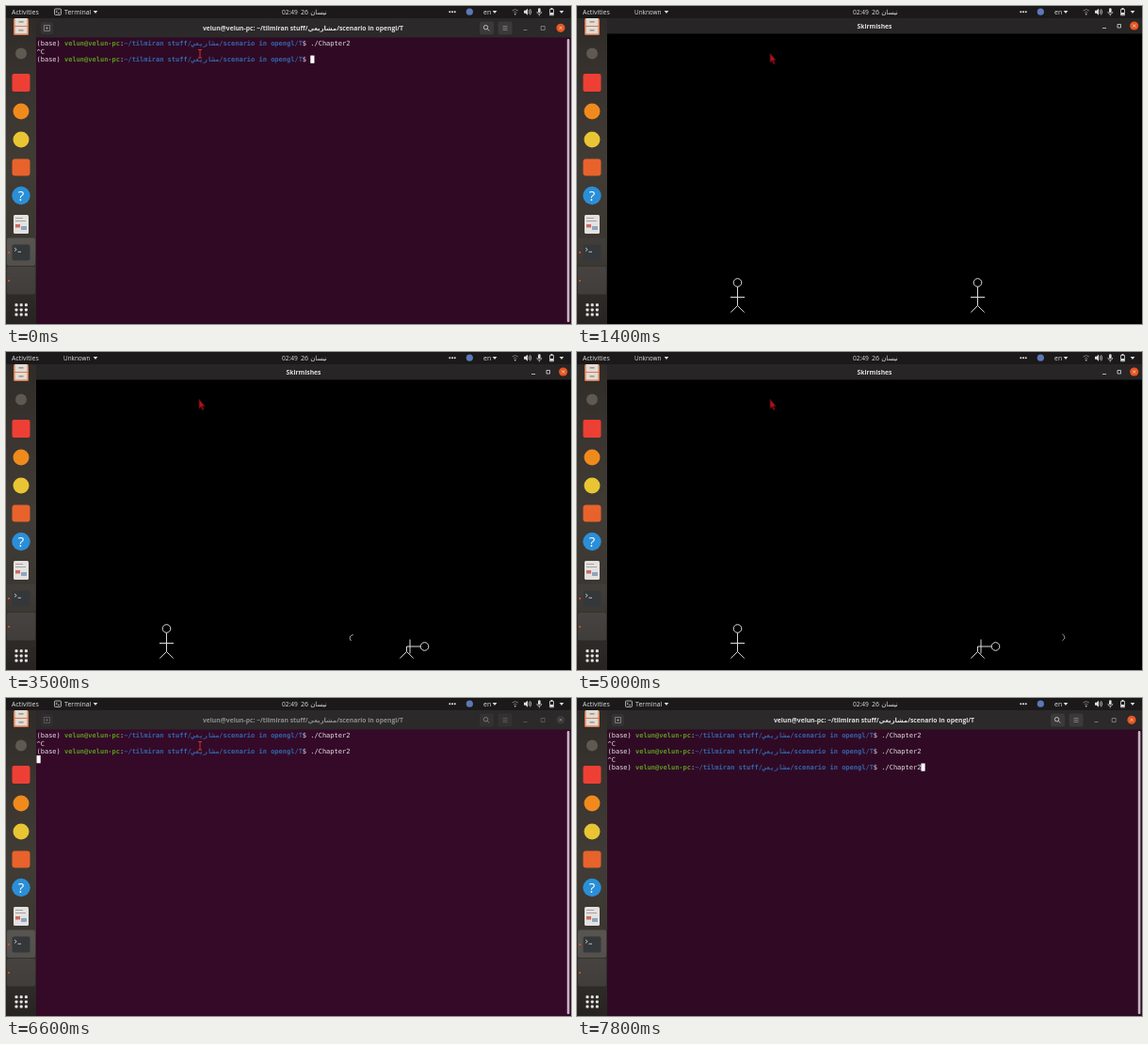
Animation, 600 px wide and 338 px high, one loop 8 s. Source, as an HTML page:

```html
<!DOCTYPE html>
<html lang="en">
<head>
<meta charset="utf-8">
<title>Desktop session</title>
<style>
  html, body { margin: 0; width: 100%; height: 100%; overflow: hidden; background: #000; }
  svg { display: block; width: 100vw; height: 100vh; }
  text { white-space: pre; }
  .ui { font: 7px "Open Sans", "Noto Sans", "DejaVu Sans", sans-serif; fill: #e0e0e0; }
  .title { font-size: 6.75px; font-weight: 700; text-anchor: middle; }
  .mono { font: 7px "DejaVu Sans Mono", monospace; fill: #e4e0e3; }
  .user { font-weight: 700; fill: #5b9a22; }
  .path { font-weight: 700; fill: #3267ad; }
  .line { fill: none; stroke: #dcdcdc; }
  .faint { fill: none; stroke: #8f8d8c; }
</style>
</head>
<body>
<svg id="stage" viewBox="0 0 600 338" preserveAspectRatio="none">
  <defs>
    <linearGradient id="dockFill" x1="0" y1="0" x2="0" y2="1">
      <stop offset="0" stop-color="#2f2b28"/>
      <stop offset=".25" stop-color="#3a3530"/>
      <stop offset=".5" stop-color="#413c35"/>
      <stop offset=".75" stop-color="#3a3631"/>
      <stop offset="1" stop-color="#262321"/>
    </linearGradient>
  </defs>

  <g id="terminal">
    <rect id="screen" x="32" y="33" width="568" height="305"/>
    <rect x="595.8" y="35" width="2.6" height="301" rx="1" fill="#c6b4c4"/>
    <rect x="32" y="13" width="568" height="20.5" fill="#2b2929"/>
    <g id="header">
      <rect x="37" y="17" width="13" height="13" rx="2" fill="#353333"/>
      <path class="faint" stroke-width=".8" d="M40.5 20.5h6v6h-6zM43.5 22v3M42 23.5h3"/>
      <rect x="503" y="16.5" width="15" height="14" rx="2" fill="#3b3939"/>
      <rect x="522.5" y="16.5" width="15" height="14" rx="2" fill="#3b3939"/>
      <circle class="line" stroke-width=".8" cx="509.5" cy="22.7" r="2.2"/>
      <path class="line" stroke-width=".8" d="M511.2 24.4l2 2"/>
      <path class="faint" stroke-width=".8" d="M527.5 21.5h5M527.5 23.5h5M527.5 25.5h5"/>
      <path class="faint" stroke-width=".8" d="M549.5 25.5h4M568.2 21.5h4v4h-4z"/>
      <circle id="close" cx="589" cy="23.3" r="4.6"/>
      <path class="line" stroke-width=".8" d="M587.4 21.7l3.2 3.2M590.6 21.7l-3.2 3.2"/>
      <text class="ui title" x="315.5" y="25.8">velun@velun-pc: ~/tilmiran stuff/مشاريعي/scenario in opengl/T</text>
    </g>
    <g id="lines"></g>
    <rect id="caret" width="4.2" height="8.2"/>
  </g>

  <g id="game">
    <rect x="32" y="29" width="568" height="309" fill="#000"/>
    <rect x="32" y="13" width="568" height="16.5" fill="#272525"/>
    <text class="ui title" x="316" y="23.6">Skirmishes</text>
    <path class="line" stroke-width=".8" d="M558 23.5h4M574 19.5h3.5v3.5h-3.5z"/>
    <circle cx="591.7" cy="21" r="4.6" fill="#e95420"/>
    <path class="line" stroke-width=".8" d="M590.1 19.4l3.2 3.2M593.3 19.4l-3.2 3.2"/>
    <g id="players"></g>
    <path id="shot" fill="none" stroke="#bdbdbd" stroke-width=".8" d="M-1.5 -3.5Q3.5 0 -1.5 3.5"/>
  </g>

  <g id="dock"></g>

  <rect width="600" height="13" fill="#1b1919"/>
  <g class="ui">
    <text x="6" y="8.7">Activities</text>
    <g id="termMenu">
      <rect x="51.5" y="3" width="7" height="6.5" rx="1" fill="#282626" stroke="#ccc" stroke-width=".8"/>
      <path class="line" stroke-width=".7" d="M53 4.8l1.3 1.2-1.3 1.2M55 7.6h2"/>
      <text x="62" y="8.7">Terminal</text>
    </g>
    <text id="gameMenu" x="61" y="8.7" font-size="6.4">Unknown</text>
    <text x="293" y="8.7" font-size="6.6">02:49</text>
    <text x="313" y="8.7">26</text>
    <text x="332" y="8.7" text-anchor="middle">نيسان</text>
    <text x="507" y="8.7">en</text>
    <g id="tray"></g>
  </g>

  <path id="beam" fill="none" stroke="#d93a28" stroke-width=".9" d="M204 46.5h4M206 46.5v8.5M204 55h4"/>
  <path id="pointer" fill="#b01218" stroke="#3a0a0c" stroke-width=".8" d="M205 50v10.3l2.2-2 1.6 3.6 1.5-.7-1.6-3.4h2.6z"/>
</svg>

<script>
const LOOP = 8000, STEP = 100, CELL = 4.214, LEFT = 32.5, ROW = 8.45;
const ENTER = 800, FOCUS = 1200, OPEN = 1400, THROW = 1600;
const FALL = 2700, FALL_TIME = 500, QUIT = 6500, STOP = 7300, RECALL = 7800;

const el = id => document.getElementById(id);
const show = (id, on) => el(id).setAttribute("display", on ? "inline" : "none");
const set = (id, attrs) => {
  for (const key in attrs) el(id).setAttribute(key, attrs[key]);
};
const col = n => LEFT + n * CELL;
const base = row => 42.2 + row * ROW;

function cells(at, row, text, kind = "") {
  return `<text class="mono ${kind}" x="${col(at)}" y="${base(row)}">${text}</text>`;
}

function prompt(row) {
  return cells(0, row, "(base)") +
    cells(7, row, "velun@velun-pc", "user") +
    cells(21, row, ":") +
    cells(22, row, "~/tilmiran stuff/", "path") +
    cells(39, row, "مشاريعي", "path") +
    cells(46, row, "/scenario in opengl/T", "path") +
    cells(67, row, "$");
}

const command = row => cells(69, row, "./Chapter2");

el("lines").innerHTML =
  prompt(0) + command(0) + cells(0, 1, "^C") + prompt(2) +
  `<g id="secondRun">${command(2)}</g>` +
  `<g id="stopped">${cells(0, 3, "^C")}${prompt(4)}</g>` +
  `<g id="thirdRun">${command(4)}</g>`;

function player(x, id) {
  return `<g class="line" transform="translate(${x} 0)">
    <g id="${id}"><circle cx="0" cy="294" r="4.3"/><path d="M0 298.5V313M-7.5 309.5H7.5"/></g>
    <path d="M0 313v5.5M-7.2 325.5L0 318.5L7.2 325.5"/></g>`;
}
el("players").innerHTML = player(170.5, "thrower") + player(425.5, "victim");

const box = (x, y, w, h, fill, rx = 0) =>
  `<rect x="${x}" y="${y}" width="${w}" height="${h}" rx="${rx}" fill="${fill}"/>`;
const dot = (x, y, r, fill) => `<circle cx="${x}" cy="${y}" r="${r}" fill="${fill}"/>`;
const glow = (id, y) =>
  `<rect id="${id}" x="1" y="${y}" width="30" height="29.5" rx="2" fill="#fff"/>`;

function dock() {
  let s = box(0, 13, 32, 325, "url(#dockFill)") + glow("termGlow", 246.5) + glow("gameGlow", 277);
  s += box(8, 13, 16, 18, "#d9794c", 1.5) + box(9.5, 13, 13, 8, "#e2dcd5") + box(9.5, 22, 13, 7.5, "#e2dcd5") +
    box(13.5, 16, 5, 1.6, "#a09890") + box(13.5, 25, 5, 1.6, "#a09890");
  s += dot(16, 50.5, 6, "#5f5952");
  s += box(6.5, 72, 19, 19, "#ee3f35", 2);
  s += dot(16, 112, 8.5, "#f08a1d");
  s += dot(16, 142, 8.5, "#e9c534");
  s += box(6.5, 162.5, 19, 18, "#e8622c", 3);
  s += dot(16, 201.5, 9.7, "#2a8fd8");
  s += `<text class="ui" x="16" y="206.8" text-anchor="middle" style="font-size:15px;fill:#fff">?</text>`;
  s += box(8, 222, 16, 20, "#e4e2e0", 1.5) + box(10, 225, 8, 1, "#a5a2a0") +
    box(10, 228, 11, 1, "#a5a2a0") + box(10, 232, 5, 3.5, "#cf6a60") + box(16, 234, 6, 4, "#8ea5bd");
  s += box(6.5, 253.5, 19, 17, "#35383a", 2);
  s += `<path class="line" stroke-width=".8" d="M9 257l2.2 1.8L9 260.6M12.5 261.3h3.5"/>`;
  for (const y of [262, 292]) s += dot(3, y, 1.1, "#e2531f");
  for (let i = 0; i < 9; i++)
    s += box(9.5 + 5.2 * (i % 3), 316.2 + 5.2 * Math.floor(i / 3), 3, 3, "#e6e5e4", .8);
  return s;
}
el("dock").innerHTML = dock();

const arrow = x => `<path d="M${x - 2.3} 5h4.6l-2.3 3z" fill="#ddd"/>`;

function tray() {
  let s = [95, 519, 590].map(arrow).join("");
  for (const x of [471.3, 474, 476.7]) s += dot(x, 6.2, 1, "#e6e6e6");
  s += dot(492.3, 6.2, 3.6, "#5b78b8");
  s += `<path class="faint" stroke-width=".8" d="M537.5 5q3.2-2.7 6.4 0M539 7q1.7-1.4 3.4 0"/>` + dot(540.7, 8.7, .8, "#ddd");
  s += `<path d="M550 4.8h1.8l2.2-2v7l-2.2-2H550z" fill="#ddd"/>`;
  s += `<path class="line" stroke-width=".8" d="M555.2 4.4q1.4 1.9 0 3.8M556.6 3.2q2.2 3.1 0 6.2"/>`;
  s += box(565, 2.3, 2.6, 5, "#ddd", 1.3);
  s += `<path class="line" stroke-width=".7" d="M563.8 6q0 2.6 2.5 2.6t2.5-2.6M566.3 8.6v2"/>`;
  s += `<path class="line" stroke-width=".8" d="M577.5 3.5h4v6.3h-4z"/>` + box(578.5, 2, 2, 1.4, "#ddd") + box(578, 7, 3, 2.4, "#ddd");
  return s;
}
el("tray").innerHTML = tray();

function caretPlace(t) {
  if (t >= RECALL) return [79, 4];
  if (t >= STOP) return [69, 4];
  if (t >= ENTER) return [0, 3];
  return [t >= STEP ? 79 : 69, 2];
}

function render(time) {
  const t = Math.floor(time / STEP) * STEP;
  const away = t >= FOCUS && t < QUIT;
  const playing = t >= OPEN && t < QUIT;
  const dim = t >= QUIT && t < QUIT + 200;

  show("termMenu", !away);
  show("gameMenu", away);
  show("terminal", !playing);
  show("game", playing);
  show("secondRun", t >= STEP);
  show("stopped", t >= STOP);
  show("thirdRun", t >= RECALL);
  show("beam", t < STEP || (t >= QUIT && t < STOP));
  show("pointer", away);

  const [c, row] = caretPlace(t);
  set("caret", {
    x: col(c), y: base(row) - 6.5,
    fill: away ? "none" : "#fff",
    stroke: away ? "#dedadd" : "none", "stroke-width": .8
  });
  set("screen", { fill: away || dim ? "#340a28" : "#300a24" });
  set("header", { opacity: dim ? .55 : 1 });
  set("close", { fill: dim ? "#454343" : "#e95420" });
  set("termGlow", { "fill-opacity": away ? .03 : .15 });
  set("gameGlow", { "fill-opacity": .09 });

  const fall = Math.min(1, Math.max(0, (t - FALL) / FALL_TIME));
  set("victim", { transform: `rotate(${90 * fall} 0 313)` });

  const flight = t - 2200;
  const x = 235.5 + flight * .1005;
  show("shot", t >= THROW && x < 606);
  set("shot", { transform: `translate(${x} ${flight < 500 ? 306 : 303.3}) rotate(${-60 + flight * 1.307})` });
}

function tick() {
  render(performance.now() % LOOP);
  requestAnimationFrame(tick);
}
tick();
</script>
</body>
</html>
```
